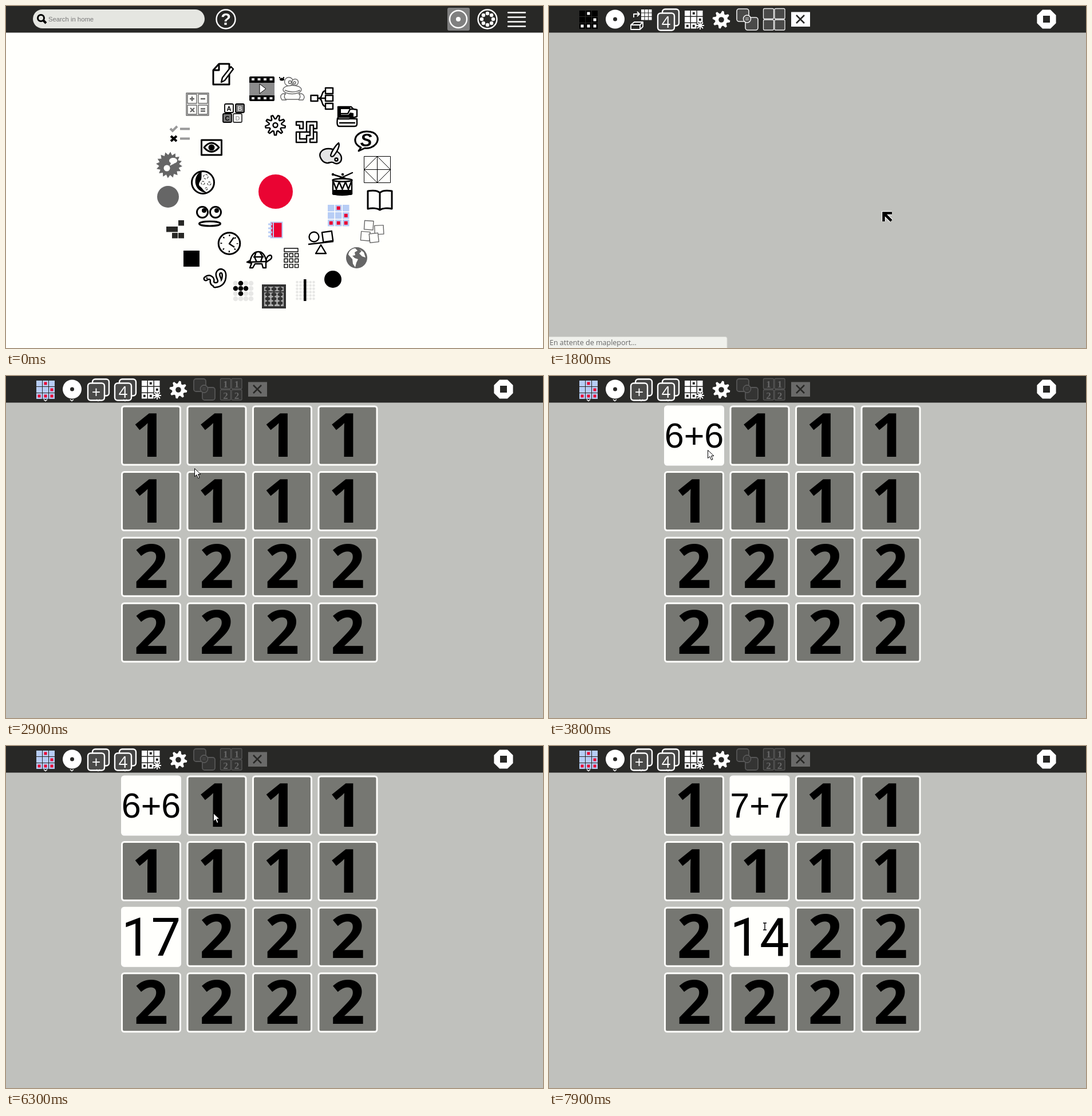
An HTML page that plays this animation: 938x597 px, repeating every 8 s.

```html
<!DOCTYPE html>
<html lang="en">
<head>
<meta charset="utf-8">
<title>Memory game</title>
<style>
  html, body { margin: 0; width: 100%; height: 100%; overflow: hidden; background: #fffffc; }
  svg { display: block; width: 100vw; height: 100vh; font-family: "Liberation Sans", Arial, sans-serif; }
  text { stroke: none; }
  .mid { text-anchor: middle; }
  .line { fill: none; stroke: #000; stroke-width: 3; stroke-linejoin: round; }
  .medium, .medium * { stroke-width: 2.4; }
  .fine, .fine * { stroke-width: 1.4; }
  .hair { stroke-width: 1; }
  .grey { stroke: #666; }
  .white { stroke: #fff; }
  .round { stroke-linecap: round; }
  .digit { font: 700 105px "Open Sans", sans-serif; }
  .sum { font-size: 61px; }
  .answer { font: 92px Roboto, sans-serif; }
</style>
</head>
<body>
<svg id="stage" viewBox="0 0 938 597" preserveAspectRatio="none"></svg>
<script>
const PAPER = '#fffffc', BAR = '#282826', BLUE = '#b7cdf5', RED = '#ea0433', DARK = '#666';

const rect = (x, y, w, h, attrs = '') => `<rect x="${x}" y="${y}" width="${w}" height="${h}" ${attrs}/>`;
const circle = (x, y, r, attrs = '') => `<circle cx="${x}" cy="${y}" r="${r}" ${attrs}/>`;
const oval = (x, y, rx, ry, attrs = '') => `<ellipse cx="${x}" cy="${y}" rx="${rx}" ry="${ry}" ${attrs}/>`;
const path = (d, attrs = '') => `<path d="${d}" ${attrs}/>`;
const text = (x, y, content, attrs = '') => `<text x="${x}" y="${y}" ${attrs}>${content}</text>`;
const group = (attrs, ...parts) => `<g ${attrs}>${parts.join('')}</g>`;
const line = (...parts) => group('class="line"', ...parts);
const medium = (...parts) => group('class="line medium"', ...parts);
const fill = color => `fill="${color}"`;
const grid = (cols, rows, x, y, step, draw) => Array.from({ length: cols * rows },
  (_, i) => draw(x + i % cols * step, y + Math.floor(i / cols) * step, i)).join('');
const twoTone = (d, outer, outerWidth, inner, innerWidth) =>
  path(d, `fill="none" stroke="${outer}" stroke-width="${outerWidth}"`) +
  path(d, `fill="none" stroke="${inner}" stroke-width="${innerWidth}"`);

// Closed shape whose corners follow a repeating list of radii.
function wheel(x, y, count, radii, attrs) {
  const total = count * radii.length;
  const points = Array.from({ length: total }, (_, i) => {
    const angle = (i + .5) / total * 2 * Math.PI, r = radii[i % radii.length];
    return `${(x + r * Math.cos(angle)).toFixed(1)},${(y + r * Math.sin(angle)).toFixed(1)}`;
  });
  return `<polygon points="${points.join(' ')}" ${attrs}/>`;
}

function memoryIcon(x, y, step, cell, mark, cellColor, markColor) {
  const inset = (cell - mark) / 2;
  return grid(3, 3, x, y, step, (cx, cy, i) => rect(cx, cy, cell, cell, fill(cellColor)) +
    ([1, 5, 6, 7, 8].includes(i) ? rect(cx + inset, cy + inset, mark, mark, fill(markColor)) : ''));
}

const homeBar = () => rect(0, 0, 938, 46.5, fill(BAR)) +
  rect(47, 6, 300, 33, 'rx="16.5" fill="#e5e6e1"') +
  line(circle(61, 21, 5.5), path('M65 25l5 5', 'stroke-width="4"')) +
  text(74, 26.5, 'Search in home', 'font-size="11.3" fill="#777"') +
  text(384, 33, '?', 'class="mid" font-size="29" font-weight="700" fill="#fff"') +
  rect(771, 3, 39, 40, 'rx="3" fill="#808080"') +
  group('class="line white medium"', circle(384, 23, 16.5), circle(790, 23, 15), circle(841, 23, 16.5),
    path('M877 11.5h30M877 19.500h30M877 27.500h30M877 35.500h30', 'class="round"')) +
  circle(790, 23, 4, fill('#fff')) +
  Array.from({ length: 8 }, (_, i) => circle(841 + 10 * Math.cos(i * Math.PI / 4),
    23 + 10 * Math.sin(i * Math.PI / 4), 3.2, fill('#fff'))).join('');

const upperIcons = () =>
  // page, film
  line(path('M372 101h18v36h-28v-25zM372 101v11h-10'),
    path('M393 106l4 4-15 20-6 3 2-8z', `fill="${PAPER}" class="medium"`)) +
  rect(425, 123, 44, 43, 'rx="2"') + rect(425, 134, 44, 22, fill('#8c8c8c')) +
  grid(4, 2, 429, 126, 10.5, (x, y, i) => rect(x, i < 4 ? 126 : 159, 5, 4, fill('#ddd'))) +
  path('M443 136v17l11-8.5z', 'fill="#fff" stroke="#000"') +
  // frog with a fly
  group('class="line grey fine"', oval(500, 146, 16, 7.5),
    path('M488 152c-3 6-2 9 1 11h22c3-2 4-5 1-11M489 154c-6-3-10 1-9 6l2 4h8M511 154c6-3 10 1 10 6l-2 4h-8M487 147q13 6 27 0'),
    circle(494, 132, 7.5, fill(PAPER)), circle(505, 133, 5.5, fill(PAPER)), circle(496, 133, 2.5), circle(504, 134, 2)) +
  oval(482, 128, 4, 2.5) + circle(478, 125, 1.2) + circle(485, 125, 1.2) +
  // tree of boxes
  medium(rect(532.5, 156, 12, 10), rect(558, 143, 13, 10), rect(558, 156, 13, 10), rect(558, 170, 13, 10),
    path('M544 161h14M546 161c8 0 4-13 12-13M546 161c8 0 4 14 12 14')) +
  // books
  medium(path('M579 196c-1 8-1 14 3 14h27q4 0 4-4v-9zM582 204h28', fill(PAPER)),
    path('M580 176h23l4 4 6 1v12l-14 4h-19z', fill(PAPER)), path('M580 188h17l4-8h6')) +
  path('M579 175h22v5h-16v10h13l3-4 6 1v8h-28z') +
  // speech
  line(path('M620 247c-19-9-9-28 10-28s23 13 16 22c-5 6-13 8-19 7l-11 5z')) +
  text(629, 245, 'S', 'class="mid" font-size="31" font-weight="700" font-style="italic"') +
  // puzzle square
  group('class="line hair"', rect(625.5, 262.5, 46, 46),
    path('M648.5 262.5v46M625.5 285.5h46M648.5 262.5l23 23-23 23-23-23z')) +
  // sums
  group('class="line grey"', group('class="fine"', rect(315, 152, 39, 39),
    grid(2, 2, 317, 154, 19, (x, y) => rect(x, y, 16, 16))),
    path('M321 162h8M325 158v8M340 162h8M322 178l7 7M329 178l-7 7M340 179.5h8M340 183.5h8', 'class="medium"')) +
  // letter blocks
  [['A', 382, 171, PAPER, '#000'], ['B', 401, 171, '#777', '#ddd'], ['C', 379, 188, '#777', '#000'], ['D', 397, 188, PAPER, '#aaa']]
    .map(([letter, x, y, back, ink]) => rect(x, y, 15, 15, `rx="2" fill="${back}" stroke="${letter === 'D' ? '#333' : '#000'}" stroke-width="1.8"`) +
      text(x + 7.5, y + 11.5, letter, `class="mid" font-size="11" font-weight="700" fill="${ink}"`)).join('') +
  // cog, maze
  medium(wheel(470.5, 208, 9, [17.5, 17.5, 11, 11]), circle(470.5, 208, 4)) +
  medium(path('M507 202h12v12h-6v-6h-6zM507 220v18h18v-6h-12v-12zM525 202h18v12h-6v-6h-6v12h-6zM519 220h12v6h-6v6M531 238h12v-18h-6v12h-6zM513 220h6M537 214v6')) +
  // palette
  medium(path('M549 264c-3-8 4-15 14-15 11 0 23 8 23 17 0 8-8 11-13 8-5-4-8 1-13 0-6-1-9-5-11-10z', fill('#e5e5e5')),
    circle(577, 268, 2.5, fill(PAPER)), path('M581 239c3 5-3 16-9 23-4 2-6 0-4-4 2-6 8-15 13-19z', fill(PAPER)));

const middleIcons = () =>
  // vote marks
  path('M287 214l4 4 8-8M304 214.5h17M304 231.5h17', 'fill="none" stroke="#999" stroke-width="4"') +
  path('M288 227l10 9M298 227l-10 9', 'stroke="#000" stroke-width="4"') +
  // eye
  line(rect(341.5, 234, 35, 26), path('M346 247q13-16 26 0-13 15-26 0z'), circle(359, 247, 4, fill('#000'))) +
  // burst
  wheel(285, 277.5, 16, [23, 17.5], fill(DARK)) + oval(292, 270, 7, 5, fill(PAPER)) +
  path('M289 272l-3 7 8-4z', fill(PAPER)) + circle(281, 283, 5.5, fill(PAPER)) +
  // moon
  line(circle(344, 308, 19.5, fill(PAPER))) +
  path('M342 288a20 20 0 0 0 10 38c-8-3-9-9-13-11-4-3-1-8 2-12 1-5 0-10 1-15z') +
  [[349, 298, 4], [344, 309, 3], [355, 310, 3], [350, 319, 2]].map(([x, y, r]) => circle(x, y, r, 'fill="none" stroke="#000" stroke-dasharray="4 2"')).join('') +
  circle(283, 333, 19, fill(DARK)) +
  // googly face
  line(circle(343, 360, 9.5), circle(366, 360, 9.5), oval(356, 380, 18.5, 4)) +
  circle(346, 357, 4) + circle(368, 357, 4) +
  // falling blocks
  [[301, 374], [280, 385], [290, 385], [290, 396], [301, 396]].map(([x, y]) => rect(x, y, 10, 9.5, fill(BAR))).join('') +
  // drum
  medium(path('M571 304v24q16 4 33 0v-24M572 307l5 13 5-13 5.500 13 5.500-13 5 13 5-13'),
    oval(587.5, 304, 17, 2.5), path('M571 294l22 7M605 291l-22 10', 'class="round"'), circle(571, 294, 1), circle(588, 294, 1)) +
  rect(570, 321, 35, 9, 'rx="3"') +
  // open book
  line(path('M653 326c-5-5-15-4-21-3v31c8-2 17-1 21 2 4-3 13-4 21-2v-31c-6-1-16-2-21 3zM653 326v30')) +
  memoryIcon(562, 347, 13, 11.5, 6, BLUE, RED) +
  // scattered squares
  group('class="line grey fine"', [[626, 375, 4], [644, 383, -3], [620, 394, 5], [635, 397, -6]].map(([x, y, turn]) =>
    rect(x, y, 15.5, 15.5, `fill="${PAPER}" transform="rotate(${turn} ${x + 8} ${y + 8})"`)).join('')) +
  circle(471, 324, 30, fill(RED)) +
  // journal
  rect(462.5, 377.5, 20, 27, `fill="${RED}" stroke="${BLUE}" stroke-width="2"`) + rect(466, 378, 2, 26, fill(BLUE)) +
  path('M458 381h7M458 388h7M458 395h7M458 402h7', `stroke="${BLUE}" stroke-width="3"`);

const lowerIcons = () =>
  // clock
  line(circle(390, 414.5, 18.8), path('M398 404l-8 11 9 6', 'class="medium"')) +
  circle(390, 414.5, 14, 'fill="none" stroke="#000" stroke-width="3" stroke-dasharray="2 9" stroke-dashoffset="1"') +
  rect(310, 427, 28, 28) +
  // turtle
  medium(path('M426 447q3-17 14-18t15 17zM432 438h18M437 429l-3 9 4 9M443 429l5 8-3 9'),
    path('M454 446c1-12 11-14 10-7-1 5-7 5-10 9v9h-5l-2-7h-12l-4 7h-5l3-8-8-2 6-3')) +
  // calculator
  group('class="line fine"', rect(486, 423, 24, 6), grid(3, 3, 486, 432, 9.3, (x, y) => rect(x, y, 6, 6))) +
  // scales
  medium(circle(538, 403, 8.5), rect(553, 394, 17, 17, 'transform="rotate(-8 561 402)"'),
    path('M528 416l44-5M550 417l-9 15h18z')) +
  // globe
  circle(612.5, 439.5, 18.5, fill(DARK)) +
  path('M598 434c1-7 7-11 12-11l4 4-5 3 1 5-5 1 4 4 6 2-3 6-2 8-4-6-1-8zM617 424l8 6 3 9-6-2-5-5 4-4z', fill(PAPER)) +
  circle(571, 477, 15) +
  // snake
  group('class="round"', twoTone('M349 476c6-5 12-1 11 4-1 8 11 8 13 2 2-6-6-10-2-17 4-5 10-2 10 5 0 11-5 17-16 18', '#000', 9, PAPER, 4)) +
  circle(351, 475, 1.5) +
  // dots
  grid(4, 4, 401, 484, 9, (x, y, i) => circle(x, y, 4.3, fill([1, 4, 5, 6, 9].includes(i) ? '#000' : '#e8e8e6'))) +
  // abacus
  rect(447, 486, 42, 42, fill('#333')) + rect(451, 490, 34, 34, fill('#aaa')) +
  path('M457 490v34M468 490v34M479 490v34', 'stroke="#333" stroke-width="2"') + rect(451, 498, 34, 2, fill('#333')) +
  grid(3, 4, 457, 494, 11, (x, y, i) => oval(x, i < 3 ? 494 : 496 + 7.5 * Math.floor(i / 3), 4.5, 3, fill('#333'))) +
  // dotted field
  grid(6, 6, 508.5, 482, 5.8, (x, y) => circle(x, y, 2.3, fill('#e8e8e6'))) + rect(520, 477, 4.5, 38);

const cardsPair = (x, y, label) => group('class="line white medium"',
  rect(x + 8, y, 29, 29, 'rx="5" fill="#444"'), rect(x, y + 7, 29, 30, 'rx="5" fill="#4a4a49"')) +
  text(x + 14.5, y + 32, label, 'class="mid" font-size="27" fill="#fff" font-family="Open Sans, sans-serif"');

const gameTools = () => circle(115.5, 23, 16.5, fill('#fff')) + circle(115.5, 23, 3.5, fill(BAR)) +
  cardsPair(190, 5.5, '4') +
  grid(3, 3, 237, 8, 11, (x, y, i) => i === 8 ? '' : rect(x, y, 9.5, 9.5, fill('#fff')) +
    ([1, 5, 6, 7].includes(i) ? rect(x + 2.8, y + 2.8, 4, 4, fill(BAR)) : '')) +
  path('M264 27v14M257 34h14M259 29l10 10M269 29l-10 10', 'stroke="#fff" stroke-width="1.8"') +
  wheel(301, 24, 8, [15.5, 15.5, 11, 11], fill('#fff')) + circle(301, 24, 4.8, fill(BAR)) +
  wheel(869, 23, 8, [18], fill('#fff')) + rect(863, 17, 12, 12, fill(BAR));

const editTools = (ink, back, cross, width) => group(`fill="${back}" stroke="${ink}" stroke-width="${width}"`,
  rect(328, 5, 21, 22, 'rx="4"'), rect(343, 20, 22, 22, 'rx="4"'), circle(346, 22.5, 6.5),
  path('M343 21h6M343 24h6', 'stroke-width="1"'),
  grid(2, 2, 374.5, 4.5, 19.5, (x, y) => rect(x, y, 18, 18, 'rx="2" stroke-width="1.3"'))) +
  rect(423, 10.5, 33, 25.5, fill(cross)) + path('M432 16l14 14M446 16l-14 14', `stroke="${BAR}" stroke-width="2.5"`);

const loadingTools = () => memoryIcon(53, 8, 11, 10, 5, '#000', '#fff') + editTools('#eee', '#4a4a49', '#fff', 1.6) +
  group('class="line white" style="stroke-width:1.8"', path('M148 20v-6h9M154 10l4 4-4 4M143 33l6-5h15l-5 5zM143 33h16v8h-16zM159 41l5-5v-8')) +
  grid(3, 3, 161, 6, 6.5, (x, y) => rect(x, y, 5.5, 5.5, fill('#fff')));

const readyTools = () => memoryIcon(53, 8, 11, 10, 5, BLUE, RED) + editTools('#565656', '#343433', '#6a6a69', 1.8) +
  cardsPair(143, 5.5, '+') +
  [1, 1, 2, 2].map((n, i) => text(383.5 + i % 2 * 19.5, 20 + (i >> 1) * 19.5, n,
    'class="mid" font-size="17" font-weight="700" font-family="Liberation Serif, serif" fill="#666"')).join('') +
  [69, 115, 161, 208].map(x => path(`M${x - 3} 41l3 2.500 3-2.500`, 'fill="none" stroke="#fff" stroke-width="1.5"')).join('');

const flips = [
  { card: 0, label: '6+6', open: 3400, close: 6400 },
  { card: 8, label: '17', open: 4500, close: 6400 },
  { card: 1, label: '7+7', open: 6425, close: Infinity },
  { card: 9, label: '14', open: 7500, close: Infinity },
];

function card(index) {
  const flip = flips.find(f => f.card === index), first = index < 8;
  const x = 253.5 + index % 4 * 114.5, y = 104 + Math.floor(index / 4) * 114.6;
  const front = flip ? group('class="front"', rect(-51, -51, 102, 102, `rx="5" fill="${PAPER}"`),
    text(0, first ? 21 : 33, flip.label, `class="mid ${first ? 'sum' : 'answer'}"`)) : '';
  return group(`transform="translate(${x} ${y})"`, group(`id="card${index}"`,
    rect(-51, -51, 102, 102, `rx="4" fill="#767772" stroke="${PAPER}" stroke-width="3"`),
    text(first ? -4 : 0, 37, first ? 1 : 2, 'class="mid digit back"'), front));
}

stage.innerHTML = group('id="home"', rect(0, 0, 938, 597, fill(PAPER)),
    rect(334, 222, 50, 50, 'id="eyeHover" rx="4" fill="#d0d0cc"'),
    rect(556, 340, 50, 50, 'id="gameHover" rx="4" fill="#d0d0cc"'),
    homeBar(), upperIcons(), middleIcons(), lowerIcons()) +
  group('id="game"', rect(0, 0, 938, 597, fill('#c0c1bd')), rect(0, 0, 938, 46.5, fill(BAR)), gameTools(),
    group('id="loading"', loadingTools()),
    group('id="ready"', readyTools(), ...Array.from({ length: 16 }, (_, i) => card(i)))) +
  group('id="status"', rect(-2, 577.5, 313, 22, 'rx="3" fill="#f0f1ec" stroke="#d8d9d4"'),
    text(1, 592, 'En attente de mapleport…', 'font-size="12.5" fill="#666" font-family="Open Sans, sans-serif"')) +
  group('id="cursor"',
    group('id="arrow"', path('M.5.5v14l3.500-3 2.500 6 2.500-1-2.500-6h4.500z', 'fill="#fff" stroke="#000"')),
    group('id="busy"', twoTone('M18 3.500H3.500V18M4 4L17 17', '#fff', 7, '#000', 4.6)),
    group('id="beam"', twoTone('M-3-6h6M0-6v12M-3 6h6', '#fff', 3.6, '#000', 1.4)));

// Pointer moves: first step, last step, destination.
const moves = [
  [400, 400, 240, 91], [700, 800, 527, 349], [900, 900, 521, 326], [1100, 1400, 581, 358],
  [2400, 2700, 330, 246], [2900, 2900, 329, 161], [3100, 3300, 276, 114], [3500, 3700, 277, 129],
  [4000, 4400, 267, 308], [5100, 5100, 270, 312], [5200, 5600, 362, 118], [6200, 6300, 362, 117],
  [6900, 7300, 365, 326], [7400, 7400, 365, 325], [7600, 7800, 377, 315],
];
const STEP = 100, LOOP = 8000, FLIP = 400;
const clamp = v => Math.min(1, Math.max(0, v));
const byId = id => document.getElementById(id);
const show = (node, on) => { node.style.display = on ? '' : 'none'; };
const showId = (id, on) => show(byId(id), on);

function pointer(t) {
  let x = 240, y = 91;
  for (const [start, end, toX, toY] of moves) {
    const p = clamp((t - start + STEP) / (end - start + STEP));
    x += (toX - x) * p;
    y += (toY - y) * p;
  }
  return [x, y];
}

function render(t) {
  showId('home', t < 1800);
  showId('game', t >= 1800);
  showId('loading', t < 2500);
  showId('ready', t >= 2500);
  showId('eyeHover', t >= 500 && t < 700);
  showId('gameHover', t >= 1300);
  showId('status', t >= 1600 && t < 2100);

  for (const { card, open, close } of flips) {
    const opening = clamp((t - open) / FLIP), closing = clamp((t - close) / FLIP);
    const node = byId('card' + card), faceUp = opening > .5 && closing < .5;
    node.setAttribute('transform', `scale(${Math.abs((1 - 2 * opening) * (1 - 2 * closing))} 1)`);
    show(node.querySelector('.front'), faceUp);
    show(node.querySelector('.back'), !faceUp);
  }

  const busy = t >= 1800 && t < 2900, beam = t === 5100 || t >= 7700;
  showId('cursor', t >= 400);
  showId('busy', busy);
  showId('beam', beam);
  showId('arrow', !busy && !beam);
  byId('cursor').setAttribute('transform', `translate(${pointer(t)})`);
}

function tick() {
  render(Math.floor(performance.now() % LOOP / STEP) * STEP);
  requestAnimationFrame(tick);
}
tick();
</script>
</body>
</html>
```
